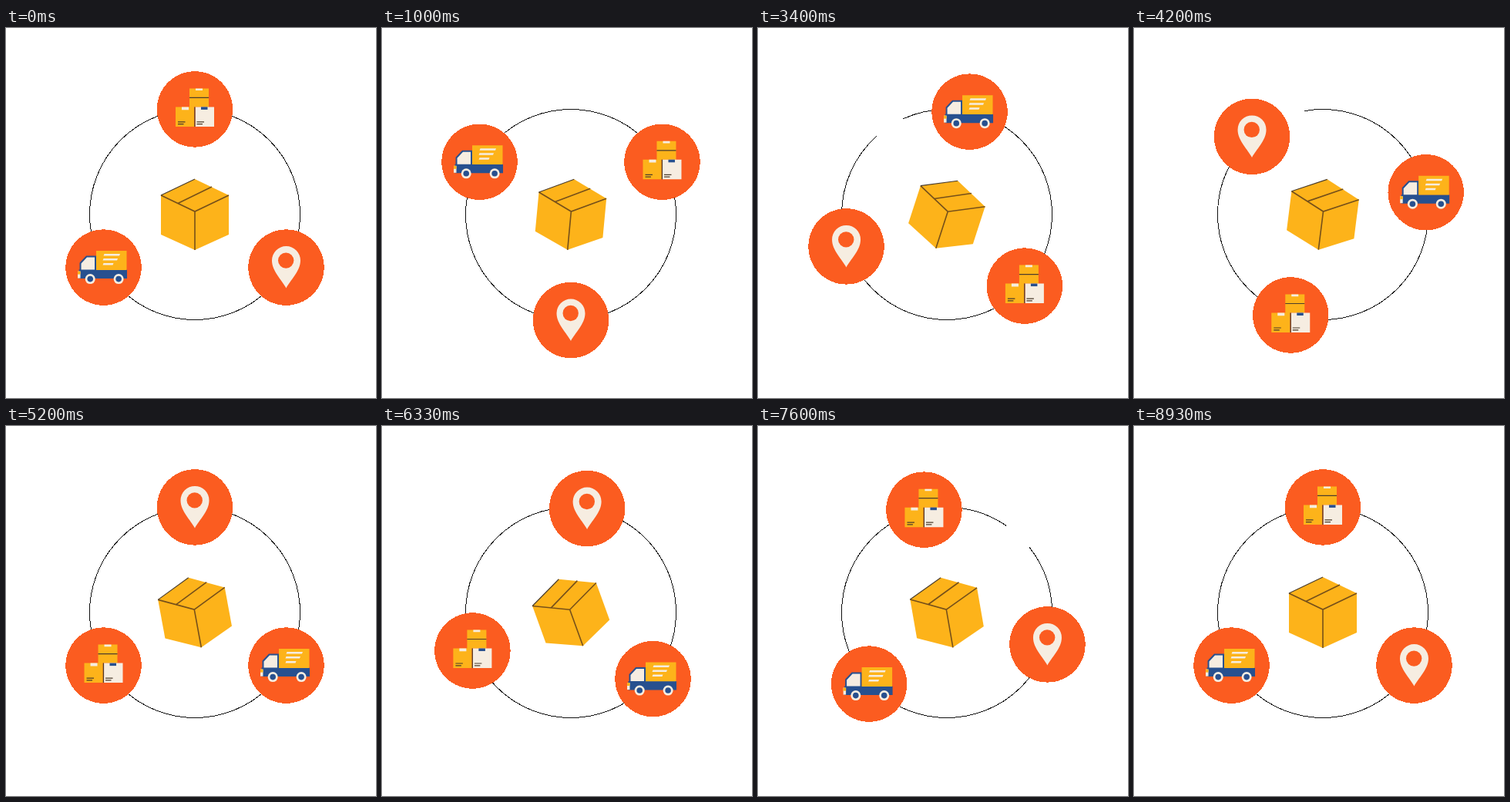
Animation of 480 by 480 pixels, one loop 8990 ms. Source, as an HTML page:

```html
<!DOCTYPE html>
<html lang="en">
<head>
<meta charset="utf-8">
<title>Delivery cycle</title>
<style>
  html, body { margin: 0; width: 100%; height: 100%; overflow: hidden; background: #fff; }
  svg { display: block; width: 100vw; height: 100vh; }
  .orange { fill: #fb5c20; }
  .yellow { fill: #fdb31a; }
  .cream { fill: #f6ede1; }
  .navy { fill: #27508f; }
  .ink { fill: none; stroke: #4b3d2c; stroke-width: 1.2; }
  .seam { fill: none; stroke: #76501a; stroke-width: 1.6; }
  .ring { fill: none; stroke: #111; stroke-width: 1; shape-rendering: crispEdges; }
  .disc { shape-rendering: crispEdges; }
</style>
</head>
<body>
<svg viewBox="0 0 480 480">
  <circle id="ring" class="ring" cx="245" cy="242" r="136.5" pathLength="360"/>

  <g id="parcel">
    <path class="yellow" d="M0-46 44-25V26L0 46-44 26V-25Z"/>
    <path class="seam" d="M-44-25 0-4 44-25M0-4V46M-22-14.5 22-36"/>
    <path class="ink" d="M-44-25 0-46"/>
  </g>

  <g class="icon">
    <circle class="orange disc" r="49.2"/>
    <path class="yellow" d="M-7-27H18V-3H-7ZM-25-3H-.8V22.5H-25Z"/>
    <path class="cream" d="M.6-3H25V22.5H.6ZM1-27H10V-24.3H1ZM-17-3H-8V.8H-17Z"/>
    <path class="navy" d="M8-3H16.5V.5H8Z"/>
    <path class="ink" d="M-7-15H18M-.1-3V22.5M-22 16.5H-12.5M-22 19.3H-14.5M2.5 16.5H12M2.5 19.3H10"/>
  </g>

  <g class="icon">
    <circle class="orange disc" r="49.2"/>
    <path class="cream" d="M0 27C-5 17-18.5 5-18.5-9A18.5 18.5 0 0 1 18.5-9C18.5 5 5 17 0 27Z"/>
    <circle class="orange" cx="-.3" cy="-9" r="10.2"/>
  </g>

  <g class="icon">
    <circle class="orange disc" r="49.2"/>
    <path class="navy" d="M-31 3V-6L-22.5-15H-9.5V3H30.5V14.5H-32V3Z"/>
    <path class="yellow" d="M-9.5-21.5H30V3.3H-9.5Z"/>
    <path class="cream" d="M-29 3V-5L-21.5-13H-11.5V3ZM1-17.5H21.5L20.5-15H0ZM0-11.5H18.5L17.5-9H-1ZM0-5.5H13L12-3H-1Z"/>
    <path class="cream" d="M-33.5 5H-30V14H-33.5Z"/>
    <path class="yellow" d="M-33.5 5H-30V9H-33.5Z"/>
    <g id="wheel">
      <circle class="cream" cx="-17.3" cy="15" r="6.5"/>
      <circle class="navy" cx="-17.3" cy="15" r="3.8"/>
    </g>
    <use href="#wheel" x="36.9"/>
  </g>
</svg>
<script>
  const LOOP = 8990, CX = 245, CY = 242.2, ORBIT = 136.8;
  const ring = document.getElementById('ring');
  const parcel = document.getElementById('parcel');
  const icons = [...document.querySelectorAll('.icon')];

  const clamp = x => Math.min(1, Math.max(0, x));
  const ease = x => (x = clamp(x), x * x * (3 - 2 * x));

  // Poses change twice per 200 ms: at 0 and at 130.
  const snap = t => {
    const rest = t % 200;
    return (t - rest + (rest >= 130 ? 133 : 0)) / 1000;
  };

  // Each third of the loop: two seconds of travel, one of rest.
  const turn = t => 120 * (Math.floor(t / 3) + ease((t % 3) / 2));

  const tilt = t =>
    20 * ease(t / 2.95) - 40 * ease((t - 2.95) / 3.3) + 20 * ease((t - 6.25) / 2.68);

  function drawRing(t) {
    const width = 17.2 * clamp((t - 2.2) / 0.8) * clamp((8.93 - t) / 0.8);
    const mid = 236.9 + 18.1 * (t - 3.4);
    if (width < 0.01) {
      ring.removeAttribute('stroke-dasharray');
      return;
    }
    ring.setAttribute('stroke-dasharray', `${360 - width} ${width}`);
    ring.setAttribute('stroke-dashoffset', -(mid + width / 2));
  }

  function draw(t) {
    drawRing(t);
    parcel.setAttribute('transform', `translate(245 242) rotate(${tilt(t)})`);
    icons.forEach((icon, i) => {
      const a = (turn(t) + i * 120 - 90) * Math.PI / 180;
      const x = CX + ORBIT * Math.cos(a), y = CY + ORBIT * Math.sin(a);
      icon.setAttribute('transform', `translate(${x} ${y})`);
    });
  }

  const start = performance.now();
  function tick() {
    draw(snap((performance.now() - start) % LOOP));
    requestAnimationFrame(tick);
  }
  tick();
</script>
</body>
</html>
```
